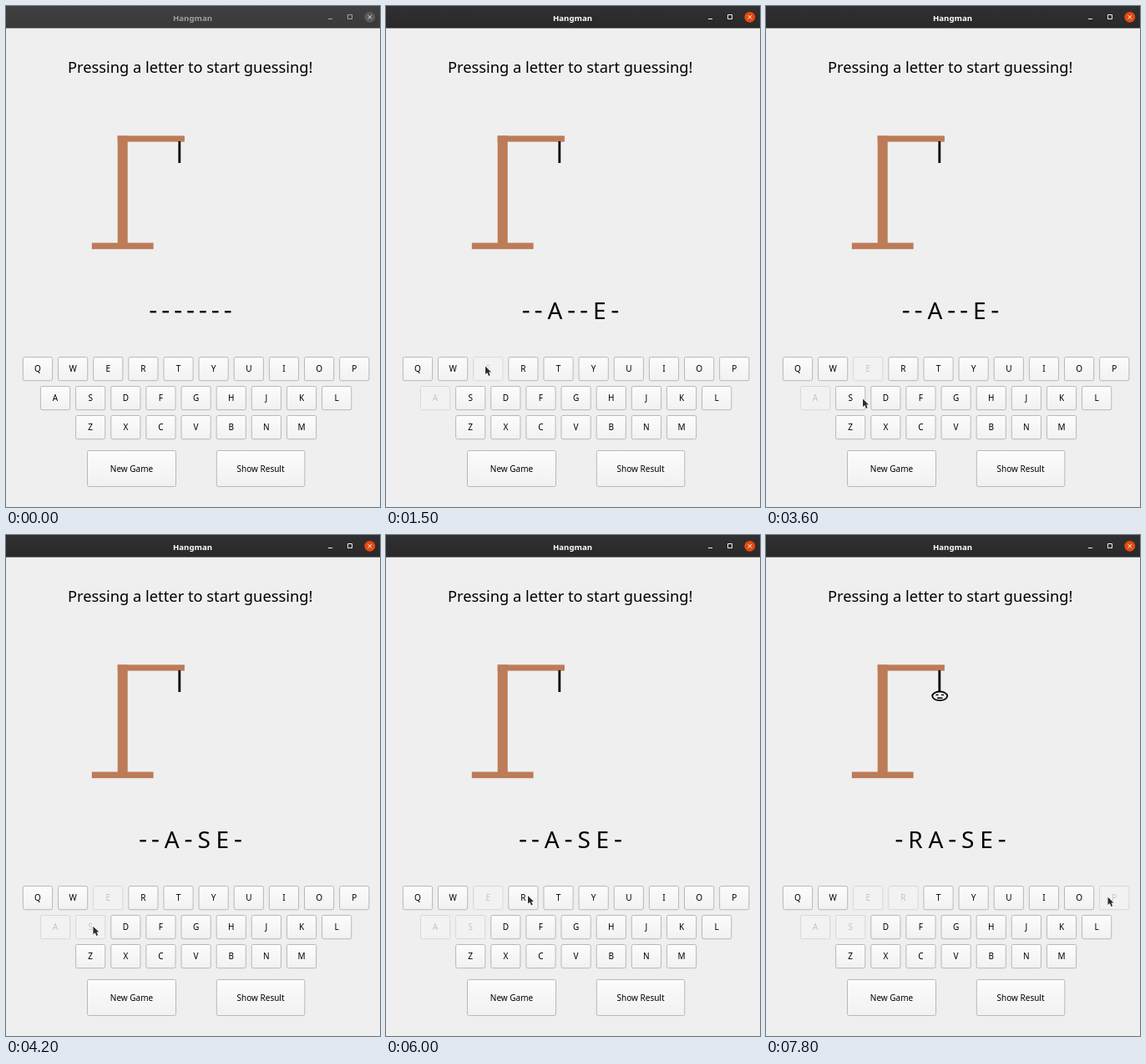
Write an HTML page with a canvas that moves like this. It is 448 px wide and 600 px high and loops after 8 s.

```html
<!DOCTYPE html>
<html lang="en">
<head>
<meta charset="utf-8">
<title>Hangman</title>
<style>
  html, body { margin: 0; width: 100%; height: 100%; overflow: hidden; background: #efefef; }
  canvas { display: block; }
</style>
</head>
<body>
<canvas id="stage" width="448" height="600"></canvas>
<script>
const ctx = document.getElementById('stage').getContext('2d');
const LOOP = 8000, STEP = 100;
const FONT = '"Noto Sans", "Open Sans", sans-serif';
const BACKGROUND = '#efefef';

const WORD = 'GRADSEN';
const ROWS = ['QWERTYUIOP', 'ASDFGHJKL', 'ZXCVBNM'];
const KEY = { width: 35.2, height: 28.2, pitch: 42.14, rowPitch: 35, center: 227.6, top: 420.5 };

const activeAt = 1100;
const guessedAt = { A: 1200, E: 1500, S: 3900, R: 6100, P: 7700 };

// Each move eases to (x, y); sag bows it downwards.
const start = { x: 0, y: 440 };
const moves = [
  { from: 500, to: 900, x: 59.5, y: 467 },
  { from: 1200, to: 1400, x: 119, y: 431 },
  { from: 1500, to: 2300, x: 225, y: 411, sag: -16 },
  { from: 2400, to: 3000, x: 38, y: 500, sag: 75 },
  { from: 3000, to: 3400, x: 116, y: 470 },
  { from: 3600, to: 3900, x: 99.5, y: 468 },
  { from: 4100, to: 4700, x: 165.5, y: 470 },
  { from: 4800, to: 5000, x: 249.5, y: 476 },
  { from: 5400, to: 6000, x: 170, y: 431.5, sag: 35 },
  { from: 6900, to: 7400, x: 409.5, y: 433, sag: 38 },
];

function pointerAt(t) {
  let { x, y } = start;
  for (const move of moves) {
    if (t <= move.from) break;
    const k = Math.min(1, (t - move.from) / (move.to - move.from));
    const eased = k * k * (3 - 2 * k);
    x += (move.x - x) * eased;
    y += (move.y - y) * eased + (move.sag ?? 0) * 4 * eased * (1 - eased);
  }
  return { x, y };
}

function rect(x, y, w, h, color) {
  ctx.fillStyle = color;
  ctx.fillRect(x, y, w, h);
}

function text(s, x, y, size, color = '#000', weight = 400) {
  ctx.font = `${weight} ${size}px ${FONT}`;
  ctx.textAlign = 'center';
  ctx.fillStyle = color;
  ctx.fillText(s, x, y);
}

function stroke(d, color, width = 1) {
  ctx.strokeStyle = color;
  ctx.lineWidth = width;
  ctx.stroke(new Path2D(d));
}

function ellipse(x, y, rx, ry, color) {
  ctx.beginPath();
  ctx.ellipse(x, y, rx, ry, 0, 0, 2 * Math.PI);
  ctx.fillStyle = color;
  ctx.fill();
}

function verticalGradient(y, h, top, bottom) {
  const g = ctx.createLinearGradient(0, y, 0, y + h);
  g.addColorStop(0, top);
  g.addColorStop(1, bottom);
  return g;
}

function titleBar(active) {
  const [top, bottom, icon, close, cross, title] = active
    ? ['#303030', '#292929', '#eee', '#e5490f', '#fff', '#fff']
    : ['#404040', '#393939', '#a5a5a5', '#5a5a5a', '#ddd', '#a0a0a0'];
  rect(0, 0, 448, 26.6, verticalGradient(0, 26.6, top, bottom));
  text('Hangman', 223.5, 17.5, 9.6, title, 700);
  stroke('M386 15.5h5 M409.5 10.5h5v5h-5z', icon);
  ellipse(435.8, 13.3, 6.4, 6.4, close);
  stroke('M433.6 11.1l4.4 4.4m0-4.4l-4.4 4.4', cross);
}

function gallows(hasHead) {
  const wood = '#bd7b58';
  rect(133.7, 155.4, 80.2, 7.2, wood);
  rect(133.7, 155.4, 12, 129, wood);
  rect(102.8, 283.6, 73.8, 7.6, wood);
  rect(206.4, 162, 2.8, 26, '#000');
  if (!hasHead) return;
  ellipse(208.2, 192.8, 9.9, 6.2, '#000');
  ellipse(208.2, 192.8, 8.1, 4.4, BACKGROUND);
  stroke('M203.5 191.5h3 M210 191.5h3 M205 195.3h6.5', '#000', 1.5);
}

function word(t) {
  const gap = 6.8, size = 28;
  ctx.font = `${size}px ${FONT}`;
  const slots = [...WORD].map(letter => t >= guessedAt[letter]
    ? { letter, width: ctx.measureText(letter).width }
    : { width: 8.1 });
  let x = 221 - slots.reduce((sum, slot) => sum + slot.width + gap, -gap) / 2;
  for (const { letter, width } of slots) {
    if (letter) text(letter, x + width / 2, 375, size);
    else rect(x + 0.3, 365, 7.5, 2.4, '#000');
    x += width + gap;
  }
}

function button(label, x, y, w, h, disabled) {
  ctx.beginPath();
  ctx.roundRect(x, y, w, h, 2);
  ctx.fillStyle = disabled ? '#f2f2f2' : verticalGradient(y, h, '#fcfcfc', '#f1f1f1');
  ctx.fill();
  ctx.strokeStyle = disabled ? '#d8d8d8' : '#b8b8b8';
  ctx.lineWidth = 1;
  ctx.stroke();
  text(label, x + w / 2, y + h / 2 + 3.8, 10, disabled ? '#c4c4c4' : '#000', 500);
}

function keyboard(t) {
  ROWS.forEach((keys, row) => [...keys].forEach((key, i) => {
    const x = KEY.center + (i - (keys.length - 1) / 2) * KEY.pitch - KEY.width / 2;
    button(key, x, KEY.top + row * KEY.rowPitch, KEY.width, KEY.height, t >= guessedAt[key]);
  }));
}

function pointer({ x, y }) {
  ctx.save();
  ctx.translate(x, y + 0.5);
  const arrow = new Path2D('M0 0V9.5L2.3 7.5L4 11.4L5.7 10.7L4.1 6.9H7Z');
  ctx.lineJoin = 'round';
  ctx.strokeStyle = '#fff';
  ctx.lineWidth = 1.2;
  ctx.stroke(arrow);
  ctx.fillStyle = '#2c2c2c';
  ctx.fill(arrow);
  ctx.restore();
}

function draw(now) {
  const t = Math.floor(now % LOOP / STEP) * STEP;
  rect(0, 0, 448, 600, BACKGROUND);
  titleBar(t >= activeAt);
  text('Pressing a letter to start guessing!', 220.7, 80, 18.3, '#000', 500);
  gallows(t >= guessedAt.P);
  word(t);
  keyboard(t);
  button('New Game', 97.5, 532.5, 106, 43);
  button('Show Result', 252.3, 532.5, 105.5, 43);
  if (t >= moves[0].from) pointer(pointerAt(t));
  requestAnimationFrame(draw);
}

requestAnimationFrame(draw);
</script>
</body>
</html>
```
